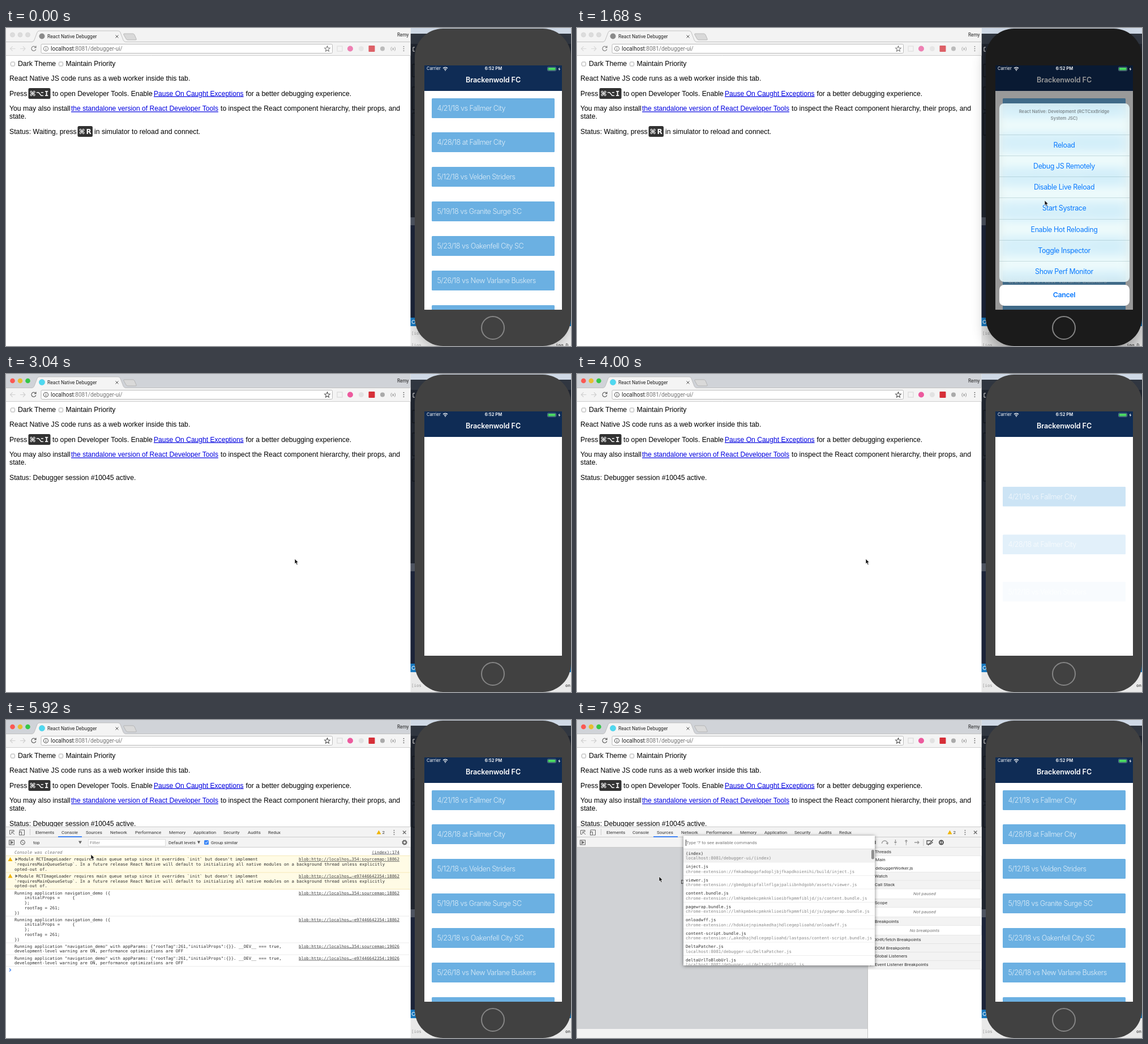
An HTML page for the animation above (8 s loop, 998x561 px).

```html
<!DOCTYPE html>
<html lang="en">
<head>
<meta charset="utf-8">
<title>Remote debugging</title>
<style>
html, body { margin: 0; width: 100%; height: 100%; overflow: hidden; background: #fff; }
#stage { position: relative; width: 998px; height: 561px; overflow: hidden; }
#stage > svg { position: absolute; left: 0; top: 0; }
text { white-space: pre; }

/* hard switches share one 8 s loop */
.until-reload, .from-reload, .until-focus, .from-focus, .from-tools, .rows, .console, .sources, .dialog {
  animation: 8s step-end infinite;
}
.until-reload { animation-name: untilReload; }
.from-reload { animation-name: fromReload; }
.until-focus { animation-name: untilFocus; }
.from-focus { animation-name: fromFocus; }
.from-tools { animation-name: fromTools; }
.console { animation-name: console; }
.rows { animation-name: rows; }
.sources { animation-name: sources; }
.dialog { animation-name: dialog; }
@keyframes untilReload { 0% { opacity: 1 } 32%, 100% { opacity: 0 } }
@keyframes fromReload { 0% { opacity: 0 } 32%, 100% { opacity: 1 } }
@keyframes untilFocus { 0% { opacity: 1 } 37%, 100% { opacity: 0 } }
@keyframes fromFocus { 0% { opacity: 0 } 37%, 100% { opacity: 1 } }
@keyframes fromTools { 0% { opacity: 0 } 65%, 100% { opacity: 1 } }
@keyframes console { 0% { opacity: 0 } 65% { opacity: 1 } 78%, 100% { opacity: 0 } }
@keyframes rows { 0% { opacity: 0 } 67%, 100% { opacity: 1 } }
@keyframes sources { 0% { opacity: 0 } 78%, 100% { opacity: 1 } }
@keyframes dialog { 0% { opacity: 0 } 84%, 100% { opacity: 1 } }

/* browser */
.ui { font-family: Roboto, "Liberation Sans", sans-serif; }
.page { font: 12.25px "Liberation Sans", Arial, sans-serif; }
.link { font-size: 12.1px; fill: #0000e0; text-decoration: underline; }
.key { font: bold 12px "DejaVu Sans", sans-serif; fill: #fff; text-anchor: middle; }
.tools { font-size: 8px; fill: #333; }
.mono { font: 7.4px "DejaVu Sans Mono", monospace; fill: #303030; }
.src { fill: #444; text-anchor: end; text-decoration: underline; }
.mute { fill: #888; }
.it { font-style: italic; fill: #777; }
.mid { text-anchor: middle; }
.strip { fill: #f3f3f3; animation: strip 8s step-end infinite; }
@keyframes strip { 0% { fill: #f3f3f3 } 37%, 100% { fill: #d0d3d8 } }
.icons { animation: icons 8s step-end infinite; }
@keyframes icons { 0% { opacity: .75 } 37%, 100% { opacity: 1 } }

/* phone */
#phone {
  position: absolute; left: 722px; top: 1px; width: 276px; height: 560px; border-radius: 50px;
  background: #414141; animation: phone 8s step-end infinite;
}
@keyframes phone {
  0% { background: #414141; box-shadow: 0 8px 14px rgba(0,0,0,.14) }
  2% { background: #1b1b1b; box-shadow: 0 16px 24px rgba(0,0,0,.3) }
  37%, 100% { background: #414141; box-shadow: none }
}
#home { position: absolute; left: 117px; top: 507px; width: 38px; height: 38px; border: 2px solid #858585; border-radius: 50%; }
#screen {
  position: absolute; left: 17px; top: 65px; width: 243px; height: 431px; overflow: hidden;
  background: #fff; font-family: Inter, Roboto, sans-serif;
}
#screen div { position: absolute; }
#nav {
  left: 0; top: 0; width: 243px; height: 44.5px; background: #0f2c55; color: #fff;
  font-size: 12.6px; font-weight: 600; text-align: center; line-height: 51px; letter-spacing: -.01em;
}
.list { left: 0; top: 0; }
.card {
  left: 13px; top: calc(57.6px + 60.85px * var(--i)); width: 207.5px; height: 35px; padding-left: 9.5px;
  border-radius: 1.5px; background: #6bb0e2; color: rgba(255,255,255,.78);
  font-size: 12.6px; font-weight: 300; line-height: 35.5px; letter-spacing: -.04em; white-space: nowrap;
}
.from-reload .card {
  animation: fade 8s linear infinite backwards, rise 8s linear infinite backwards;
  animation-delay: calc(95ms * var(--i));
}
@keyframes fade { 0%, 47.25% { opacity: 0 } 55.25%, 100% { opacity: 1 } }
@keyframes rise {
  0%, 47.25% { transform: translateY(128px); animation-timing-function: cubic-bezier(.33,.33,.67,.97) }
  55.25%, 100% { transform: none }
}
#dim { inset: 0; background: #000; animation: dim 8s infinite; }
@keyframes dim {
  0%, 9.75% { opacity: 0; animation-timing-function: cubic-bezier(.16,1,.3,1) }
  14.75%, 26% { opacity: .4; animation-timing-function: ease-in-out }
  31%, 100% { opacity: 0 }
}
#bar { left: 0; top: 0; width: 243px; height: 14px; color: #fff; font-size: 7.6px; line-height: 12px; }
#sheet { left: 6.5px; top: 67px; width: 230px; height: 358px; animation: sheet 8s infinite; }
@keyframes sheet {
  0%, 9.75% { transform: translateY(366px); animation-timing-function: cubic-bezier(.16,1,.3,1) }
  14.75%, 26% { transform: none; animation-timing-function: ease-in-out }
  31%, 100% { transform: translateY(366px) }
}
#menu {
  left: 0; top: 0; width: 230px; height: 315px; border-radius: 8.5px; overflow: hidden;
  background: rgba(236,251,250,.82); backdrop-filter: blur(9px) brightness(1.7) saturate(1.2);
}
#menu .head { top: 8.5px; width: 230px; text-align: center; font-size: 7.7px; font-weight: 600; line-height: 12px; color: #7f8a8e; }
#menu .item, #cancel {
  width: 230px; height: 37.1px; box-sizing: border-box; text-align: center; color: #0a7aff;
  font-size: 12.4px; line-height: 36.5px; letter-spacing: -.03em;
}
#menu .item { top: calc(55px + 37.15px * var(--i)); border-top: 1px solid rgba(90,130,140,.25); }
#cancel { top: 320px; border-radius: 8.5px; background: #fff; font-weight: 600; }

#cursor { animation: cursor 8s ease-in-out infinite; }
@keyframes cursor {
  0%, 2% { transform: translate(770px,600px) }
  7%, 12.2% { transform: translate(795px,533px) }
  20%, 21% { transform: translate(826px,304px) }
  23%, 29.5% { transform: translate(838px,244px) }
  36%, 50% { transform: translate(510px,326px) }
  57% { transform: translate(475px,326px) }
  66% { transform: translate(300px,270px) }
  74% { transform: translate(150px,237px) }
  78%, 84% { transform: translate(155px,201px) }
  90%, 100% { transform: translate(145px,276px) }
}
</style>
</head>
<body>
<div id="stage">
<svg width="998" height="561" viewBox="0 0 998 561">
  <!-- desktop, editor and terminal behind the phone -->
  <rect width="998" height="561" fill="#20252f"/>
  <rect x="714" width="284" height="10" fill="#cfd9e6"/>
  <rect x="714" y="10" width="284" height="18" fill="#303640"/>
  <rect x="714" y="334" width="8" height="14" fill="#4d5360"/>
  <rect x="714" y="348" width="284" height="163" fill="#1c2439"/>
  <g fill="none" stroke="#0d1015"><path d="M722 64h-4v22h4M722 104h-4v40h4M722 150h-4v39h4"/><path d="M722 34h-3v7h3" stroke="#ddd"/></g>
  <rect x="714" y="511" width="284" height="15" fill="#1878be"/>
  <circle cx="720" cy="518.500" r="3" fill="none" stroke="#fff"/>
  <rect x="714" y="526" width="284" height="35" fill="#e9e9e9"/>
  <g class="mono" style="fill:#999">
    <g class="until-focus"><text x="716" y="541">[ios</text><text x="716" y="562">[ios</text><text x="971" y="562" fill="#222">ing D</text></g>
    <g class="from-focus"><text x="716" y="551.500">[ios</text><text x="988" y="551.500" fill="#222">on</text></g>
  </g>

  <!-- browser window -->
  <rect width="714.500" height="561" fill="#fff"/>
  <rect class="strip" width="714.500" height="25"/>
  <g fill="#dcdcdc" stroke="#cfcfcf" stroke-width=".6"><circle cx="11.500" cy="12" r="4"/><circle cx="25" cy="12" r="4"/><circle cx="38.500" cy="12" r="4"/></g>
  <g class="from-focus"><circle cx="11.500" cy="12" r="4.300" fill="#fb5852"/><circle cx="25" cy="12" r="4.300" fill="#e6be30"/><circle cx="38.500" cy="12" r="4.300" fill="#34c748"/></g>
  <rect y="24" width="714.500" height="24.500" fill="#f4f4f4"/>
  <path d="M0 24.500H46Q49 24 50 21L55 8Q56 5 59 5H198Q201 5 202 8L207 21Q208 24 211 24.500H714" fill="#f4f4f4" stroke="#b4b4b4" stroke-width=".8"/>
  <path d="M209 10H224Q226 10 227 12L230 19Q231 21 229 21H215Q213 21 212 19L208 12Q207 10 209 10Z" fill="#d9d9d9" stroke="#adadad" stroke-width=".8"/>
  <path d="M0 48.500H714.500" stroke="#cecece"/>
  <circle cx="63.500" cy="14.500" r="5" fill="#8a8a8a"/>
  <circle class="from-focus" cx="63.500" cy="14.500" r="5.300" fill="#4fd8f0"/>
  <g class="ui">
    <text x="73" y="17.500" font-size="8.600" fill="#222">React Native Debugger</text>
    <text x="691" y="15.300" font-size="8.200" fill="#222">Remy</text>
  </g>
  <path d="M193.500 12.500l5 5m0-5l-5 5" stroke="#555"/>
  <rect x="62" y="28.500" width="514.500" height="16" rx="2" fill="#fff" stroke="#bababa"/>
  <g class="icons" fill="none" stroke="#555" stroke-width="1.100">
    <path d="M16.500 36.500H7.500m4-4l-4 4l4 4M25 36.500h9m-4-4l4 4l-4 4" stroke="#cfcfcf"/>
    <path d="M52.300 34a4 4 0 1 0 .5 3.500M53 31.500v3.200h-3.200"/>
    <circle cx="70.500" cy="36.500" r="4"/><path d="M70.500 36v3M70.500 34v1"/>
    <path d="M567.500 31.800l1.400 3.200l3.400.3l-2.600 2.300l.8 3.400l-3-1.800l-3 1.800l.8-3.400l-2.600-2.300l3.400-.3z"/>
    <rect x="585" y="32" width="9" height="9" stroke="#d8d8d8"/>
    <circle cx="608" cy="36.500" r="5" fill="#ec5a9e" stroke="none"/>
    <circle cx="627.500" cy="36.500" r="4.500" fill="#e2e2e2" stroke="none"/>
    <rect x="640.500" y="31" width="11" height="11" rx="1" fill="#d62f38" stroke="none"/>
    <circle cx="665" cy="36.500" r="4" fill="#aaa" stroke="none"/>
    <text class="ui" x="679" y="39" font-size="8" fill="#777" stroke="none">(x)</text>
    <path d="M702.500 32v1.600m0 2.100v1.600m0 2.100v1.600" stroke-width="1.600"/>
  </g>
  <text class="ui" x="79" y="40" font-size="10" fill="#777"><tspan fill="#222">localhost</tspan>:8081/debugger-ui/</text>

  <g class="page">
    <g fill="#fff" stroke="#a5a5a5"><rect x="8.500" y="60" width="7" height="7" rx="1.500"/><rect x="93.500" y="60" width="7" height="7" rx="1.500"/></g>
    <text x="21" y="67.200">Dark Theme</text><text x="105.500" y="67.200">Maintain Priority</text>
    <text x="6" y="93.400">React Native JS code runs as a web worker inside this tab.</text>
    <text x="6" y="119.500">Press</text>
    <rect x="39.500" y="106" width="39" height="19" rx="2.500" fill="#333"/>
    <g class="key"><text x="47" y="120">⌘</text><text x="60" y="120">⌥</text><text x="71.500" y="120" font-family="DejaVu Sans Mono, monospace">I</text></g>
    <text x="82" y="119.500">to open Developer Tools. Enable</text>
    <text x="261" y="119.500" class="link">Pause On Caught Exceptions</text>
    <text x="423.500" y="119.500">for a better debugging experience.</text>
    <text x="6" y="146.300">You may also install</text>
    <text x="115" y="146.300" class="link">the standalone version of React Developer Tools</text>
    <text x="379" y="146.300">to inspect the React component hierarchy, their props, and</text>
    <text x="6" y="160.200">state.</text>
    <g class="until-focus">
      <text x="6" y="186.700">Status: Waiting, press</text>
      <rect x="126.500" y="173" width="26.500" height="19" rx="2.500" fill="#333"/>
      <g class="key"><text x="134" y="187">⌘</text><text x="146" y="187">R</text></g>
      <text x="156" y="186.700">in simulator to reload and connect.</text>
    </g>
    <text class="from-focus" x="6" y="186.700">Status: Debugger session #10045 active.</text>
  </g>

  <!-- developer tools -->
  <g class="from-tools ui tools">
    <rect y="188.500" width="714.500" height="373" fill="#fff"/>
    <rect y="188.500" width="714.500" height="36" fill="#f3f3f3"/>
    <path d="M0 188.500H714.500M0 206.500H714.500M0 224.500H714.500M42.500 192v11" stroke="#ccc"/>
    <g fill="none" stroke="#666">
      <path d="M9 201.500H6.500v-7h7.500v2.500M10 197l5 5m-5-5v4m0-4h4"/>
      <path d="M24 199v-5h8.500v9h-4"/><rect x="23.500" y="197.500" width="4" height="5.500"/>
      <path d="M701 195.500l5.500 5.500m0-5.500l-5.500 5.500" stroke-width="1.200"/>
      <path d="M685.500 194v1.600m0 2v1.600m0 2v1.600" stroke-width="1.600"/>
      <rect x="5.500" y="212" width="9" height="8"/><path d="M8 212v8"/><path d="M9.500 214l3 2l-3 2z" fill="#666"/>
    </g>
    <path d="M658.500 194.500l4 7h-8z" fill="#f0b400"/><text x="664.500" y="201">2</text>
    <g id="tabs"></g>
  </g>

  <g class="console ui tools">
    <rect x="92" y="205" width="42" height="2" fill="#4285f4"/>
    <circle cx="29.500" cy="216" r="3.800" fill="none" stroke="#666" stroke-width="1.200"/><path d="M27 213.500l5 5" stroke="#666"/>
    <text x="48" y="219">top</text><path d="M128 213.500h6l-3 5z" fill="#666"/>
    <rect x="145.500" y="210.500" width="136" height="12" fill="#fff" stroke="#ddd"/><text x="148" y="219.300" class="mute">Filter</text>
    <text x="287" y="219">Default levels</text><path d="M338 213.500h5l-2.500 5z" fill="#555"/>
    <rect x="350" y="212" width="8" height="8" rx="1.500" fill="#3b86f7"/><path d="M352 216l1.500 1.800l3-4" fill="none" stroke="#fff"/>
    <text x="362" y="219">Group similar</text>
    <circle cx="704" cy="216" r="3" fill="none" stroke="#666" stroke-width="2"/><circle cx="704" cy="216" r="4.300" fill="none" stroke="#666" stroke-dasharray="1.700"/>
    <g class="rows">
      <rect y="239.500" width="714" height="59" fill="#fffbe5"/>
      <path d="M0 239.500H714M0 269H714M0 298.500H714" stroke="#f6e9b8"/>
      <path d="M0 346H714M0 393H714M0 414H714M0 434.500H714" stroke="#ececec"/>
      <g fill="#f0b400"><path d="M7.500 242l4 7h-8z"/><path d="M7.500 271.500l4 7h-8z"/></g>
      <g fill="#666"><path d="M16.500 243l4.500 2.700l-4.500 2.700z"/><path d="M16.500 272.500l4.500 2.700l-4.500 2.700z"/></g>
      <path d="M6 438.500l2.500 2.500l-2.500 2.500" fill="none" stroke="#367cf1" stroke-width="1.200"/>
      <g id="log" class="mono"></g>
    </g>
  </g>

  <g class="sources ui tools">
    <rect x="135" y="205" width="43" height="2" fill="#4285f4"/>
    <rect y="225" width="513" height="320" fill="#d0d2d5"/>
    <rect y="545" width="513" height="16" fill="#f3f3f3"/>
    <text class="mid" x="257" y="289" font-size="9.200">Drop in a folder to add to workspace</text>
    <path d="M513.500 207V561" stroke="#c4c4c4"/>
    <g fill="none" stroke="#999" stroke-width="1.300">
      <path d="M523 213v6m4-6v6" stroke="#555"/>
      <path d="M538.500 218a5 5 0 0 1 10 0m-2.500-1l2.500 2l1-3"/>
      <path d="M562.500 211v6m-2-2l2 2l2-2M562.500 219v1.500M581.500 218v-6m-2 2l2-2l2 2M581.500 219v1.500M596 216h8m-2.500-2.500l2.500 2.500l-2.500 2.500"/>
      <path d="M612 210v12" stroke="#ccc"/><path d="M618 219h6l4-3l-4-3h-6zM620 221l9-10" stroke="#555"/>
      <circle cx="643.500" cy="216" r="4.500" fill="#555" stroke="none"/><path d="M642 214v4m3-4v4" stroke="#fff"/>
    </g>
    <g id="side"></g>
  </g>

  <g class="dialog ui tools">
    <rect x="188" y="204" width="338" height="229" fill="#fff" style="filter:drop-shadow(0 1px 3px rgba(0,0,0,.5))"/>
    <path d="M192.500 211v11" stroke="#333"/><path d="M188 227.500H526" stroke="#ddd"/>
    <text x="193" y="219" fill="#777">Type '?' to see available commands</text>
    <rect x="188" y="228" width="338" height="23" fill="#f1f1f1"/>
    <clipPath id="box"><rect x="188" y="228" width="338" height="205"/></clipPath>
    <g id="files" class="mono" clip-path="url(#box)"></g>
    <rect x="520" y="229" width="5" height="16.500" rx="2" fill="#909090"/>
  </g>
</svg>

<div id="phone">
  <div id="home"></div>
  <div id="screen">
    <div class="list until-reload"></div>
    <div class="list from-reload"></div>
    <div id="nav">Brackenwold FC</div>
    <div id="dim"></div>
    <div id="bar">
      <div style="left:4px">Carrier</div>
      <div style="left:0;width:244px;text-align:center;font-weight:600">6:52 PM</div>
      <svg width="243" height="14" fill="none" stroke="#fff" style="position:absolute;left:0;top:0">
        <path d="M33 5a6 6 0 0 1 8 0M34.800 7a3.500 3.500 0 0 1 4.400 0" stroke-width="1.300"/><circle cx="37" cy="8.700" r=".6"/>
        <rect x="217.500" y="3" width="15" height="6.500" rx="1.300" stroke="#8296ae" stroke-width=".7"/>
        <rect x="218.500" y="4" width="13" height="4.500" rx=".7" fill="#4cd964" stroke="none"/>
        <path d="M239 3l-2.500 4h1.800l-.8 3l2.700-4h-1.800z" fill="#fff" stroke="none"/>
      </svg>
    </div>
    <div id="sheet">
      <div id="menu"><div class="head">React Native: Development (RCTCxxBridge<br>System JSC)</div></div>
      <div id="cancel">Cancel</div>
    </div>
  </div>
</div>

<svg width="998" height="561" viewBox="0 0 998 561">
  <path id="cursor" d="M0 0V9l2-1.800l1.500 3.400l1.700-.7l-1.500-3.300h2.700z" fill="#111" stroke="#fff" stroke-width=".7"/>
</svg>
</div>

<script>
const $ = q => document.querySelector(q);

function put(box, tag, attrs, label) {
  const el = document.createElementNS('http://www.w3.org/2000/svg', tag);
  for (const k in attrs) el.setAttribute(k, attrs[k]);
  if (label) el.textContent = label;
  $(box).append(el);
}
const write = (box, x, mid, label, cls = '') => put(box, 'text', { x, y: mid + 2.6, class: cls }, label);

function add(box, cls, label, i) {
  const el = document.createElement('div');
  el.className = cls;
  el.textContent = label;
  el.style.setProperty('--i', i);
  box.append(el);
}

const games = ['4/21/18 vs Fallmer City', '4/28/18 at Fallmer City', '5/12/18 vs Velden Striders',
  '5/19/18 vs Granite Surge SC', '5/23/18 vs Oakenfell City SC', '5/26/18 vs New Varlane Buskers', ''];
document.querySelectorAll('.list').forEach(list => games.forEach((g, i) => add(list, 'card', g, i)));

['Reload', 'Debug JS Remotely', 'Disable Live Reload', 'Start Systrace', 'Enable Hot Reloading',
  'Toggle Inspector', 'Show Perf Monitor'].forEach((name, i) => add($('#menu'), 'item', name, i));

const tabs = { Elements: 52, Console: 98, Sources: 141, Network: 184, Performance: 228, Memory: 288,
  Application: 331, Security: 384, Audits: 427, Redux: 463 };
for (const name in tabs) write('#tabs', tabs[name], 198, name);

// console log
const blob = 'blob:http://localhos…';
const links = ['354:sourcemap:', '–e97446642354:'];
function entry(top, lines, link, indent = 0) {
  lines.forEach((s, i) => write('#log', i ? 15 : 15 + indent, top + i * 8.8, s));
  write('#log', 695, top, link, 'src');
}
write('#log', 15, 233, 'Console was cleared', 'it');
write('#log', 695, 233, '(index):174', 'src');
const warning = ["Module RCTImageLoader requires main queue setup since it overrides `init` but doesn't implement",
  '`requiresMainQueueSetup`. In a future release React Native will default to initializing all native modules on a background thread unless explicitly',
  'opted-out of.'];
const running = ['Running application navigation_demo ({', '    initialProps =     {', '    };', '    rootTag = 261;', '})'];
const params = ['Running application "navigation_demo" with appParams: {"rootTag":261,"initialProps":{}}. __DEV__ === true,',
  'development-level warning are ON, performance optimizations are OFF'];
links.forEach((link, i) => {
  entry(245.7 + i * 29.4, warning, blob + link + 18862, 7);
  entry(305 + i * 47, running, blob + link + 18862);
  entry(399 + i * 21, params, blob + link + 19026);
});

// debugger sidebar
function section(mid, name) {
  put('#side', 'rect', { x: 514, y: mid - 7.5, width: 200.5, height: 15, fill: '#f3f3f3', stroke: '#ddd', 'stroke-width': .6 });
  put('#side', 'path', { d: `M518 ${mid - 2.3}l4 2.300l-4 2.300z`, fill: '#777' });
  write('#side', 526, mid, name);
}
[[232, 'Threads'], [275.7, 'Watch'], [290.5, 'Call Stack'], [322.8, 'Scope'], [355, 'Breakpoints'],
  [387, 'XHR/fetch Breakpoints'], [402, 'DOM Breakpoints'], [416.8, 'Global Listeners'],
  [431.7, 'Event Listener Breakpoints']].forEach(s => section(...s));
write('#side', 527, 246.3, 'Main');
write('#side', 527, 261, 'debuggerWorker.js');
[[306.7, 'Not paused'], [338.8, 'Not paused'], [371, 'No breakpoints']].forEach(([y, s]) => write('#side', 614, y, s, 'it mid'));

// open-file dialog
const ext = 'chrome-extension:/', local = 'localhost:8081/debugger-ui/';
[['(index)', local + '(index)'],
  ['inject.js', ext + '/fmkadmapgofadopljbjfkapdkoienihi/build/inject.js'],
  ['viewer.js', ext + '/gbmdgpbipfallnflgajpaliibnhdgobh/assets/viewer.js'],
  ['content.bundle.js', ext + '/lmhkpmbekcpmknklioeibfkpmmfibljd/js/content.bundle.js'],
  ['pagewrap.bundle.js', ext + '/lmhkpmbekcpmknklioeibfkpmmfibljd/js/pagewrap.bundle.js'],
  ['onloadwff.js', ext + '/hdokiejnpimakedhajhdlcegeplioahd/onloadwff.js'],
  ['content-script.bundle.js', ext + '…akedhajhdlcegeplioahd/lastpass/content-script.bundle.js'],
  ['DeltaPatcher.js', local + 'DeltaPatcher.js'],
  ['deltaUrlToBlobUrl.js', local + 'deltaUrlToBlobUrl.js']
].forEach(([name, path], i) => {
  const y = 235 + i * 23.5;
  write('#files', 192, y, name);
  write('#files', 192, y + 8.7, path, 'mute');
  put('#files', 'path', { d: `M188 ${y + 16}H526`, stroke: '#eee' });
});
</script>
</body>
</html>
```
